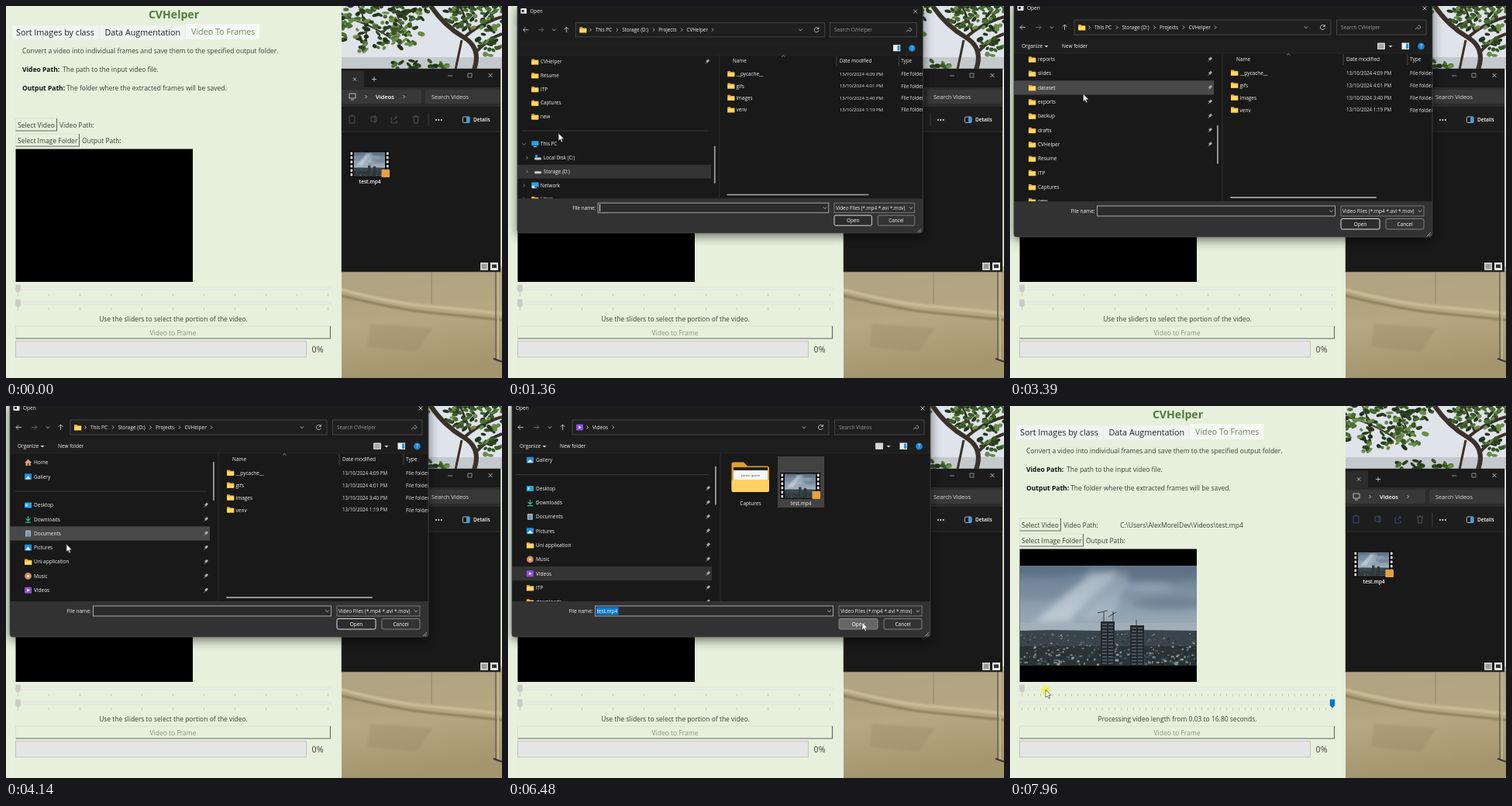
Animation of 640x480 px, one loop 8 s. Source, as an HTML page:

```html
<!DOCTYPE html>
<html lang="en">
<head>
<meta charset="utf-8">
<title>Video to frames</title>
<style>
  html, body { margin: 0; width: 100%; height: 100%; overflow: hidden; background: #e6f0dc; }
  svg { display: block; width: 100vw; height: 100vh; font-family: "Open Sans", "Noto Sans", sans-serif; }
  text { white-space: pre; }
</style>
</head>
<body>
<svg id="stage" viewBox="0 0 640 480"></svg>
<script>
const LOOP = 8000;
const APP = 8.5, TAB = 10.75, UI = 6.5;

let seed = 7;
const rand = (a = 0, b = 1) => {
  seed = (seed * 16807) % 2147483647;
  return a + (b - a) * seed / 2147483647;
};
const pick = list => list[Math.floor(rand(0, list.length))];
const times = (n, fn) => Array.from({ length: n }, (_, i) => fn(i)).join('');

// y is the vertical middle of the capitals
const text = (x, y, s, size, fill, attrs = '') =>
  `<text x="${x}" y="${y + size * .36}" font-size="${size}" fill="${fill}" ${attrs}>${s}</text>`;
const ui = (x, y, s, fill = '#f2f2f2', attrs = '') => text(x, y, s, UI, fill, 'font-weight="500" ' + attrs);
const box = (x, y, w, h, fill, attrs = '') =>
  `<rect x="${x}" y="${y}" width="${w}" height="${h}" fill="${fill}" ${attrs}/>`;
const line = (d, stroke = '#ddd', w = .8, attrs = '') =>
  `<path d="${d}" fill="none" stroke="${stroke}" stroke-width="${w}" ${attrs}/>`;
const shape = (d, fill, attrs = '') => `<path d="${d}" fill="${fill}" ${attrs}/>`;
const group = (id, body, attrs = '') => `<g id="${id}" ${attrs}>${body}</g>`;
const cross = (x, y, r = 2.5) => line(`M${x - r} ${y - r}l${2 * r} ${2 * r}m0 ${-2 * r}l${-2 * r} ${2 * r}`);
const chevronRight = (x, y, c) => line(`M${x - 1} ${y - 2}l2 2l-2 2`, c);
const chevronDown = (x, y, c) => line(`M${x - 2.2} ${y - 1}l2.2 2.2l2.2 -2.2`, c);
const middle = 'text-anchor="middle"';

const icons = {
  folder: (x, y) => shape(`M${x} ${y - 3.5}h3.5l1 1.2h4.7v6.3h-9.2z`, '#e9a92c') + box(x, y - 1.4, 9.2, 5, '#ffd766'),
  home: (x, y) => shape(`M${x} ${y}l4.6 -4.3l4.6 4.3h-1.4v4h-6.4v-4z`, '#d9a08c') + box(x + 3.5, y + 1, 2.2, 3, '#7a4a3c'),
  picture: (x, y) => box(x, y - 4, 9, 8, '#1f8fe0', 'rx="1"') + shape(`M${x + 1} ${y + 3}l3.5 -4l3.5 4z`, '#fff'),
  desktop: (x, y) => box(x, y - 3.5, 9, 7, '#22a7e0', 'rx="1"') + box(x + 1.5, y - 1.5, 2, 3, '#d4f1ff'),
  download: (x, y) => line(`M${x + 4.5} ${y - 4}v6m-2.8 -2.8l2.8 2.8l2.8 -2.8M${x + 1} ${y + 4}h7`, '#2fc49a', 1.2),
  document: (x, y) => box(x + 1, y - 4, 7, 8, '#9fb6cc', 'rx="1"') + line(`M${x + 2.5} ${y - 1.5}h4m-4 2h4m-4 2h4`, '#44617d'),
  music: (x, y) => `<circle cx="${x + 4.5}" cy="${y}" r="4.4" fill="#d98a5c"/><circle cx="${x + 4.5}" cy="${y}" r="1.5" fill="#fff"/>`,
  video: (x, y) => box(x, y - 4, 9, 8, '#8a4fd8', 'rx="1"') + shape(`M${x + 3.2} ${y - 2}l3.6 2l-3.6 2z`, '#fff'),
  pc: (x, y) => box(x, y - 4, 9.5, 6.2, '#2aa0e8', 'rx=".8"') + box(x + 2.5, y + 2.8, 4.5, 1.2, '#9cc'),
  disk: (x, y) => box(x, y - .5, 9, 3, '#c9d0d6', 'rx="1"'),
  system: (x, y) => icons.disk(x, y) + box(x + 1, y - 4, 3, 3, '#2aa0e8'),
  network: (x, y) => icons.pc(x, y) + `<circle cx="${x + 2}" cy="${y + 2}" r="2" fill="#cde6f6"/>`,
};

/* ---------- scenery ---------- */
function citySymbol() {
  const house = () => {
    const depth = rand(), y = 87 + 40 * depth;
    return box(rand(0, 226), y, rand(1, 2 + 3 * depth), rand(.8, 1.5 + 2 * depth),
      pick(['#8d979b', '#6a767b', '#1f272b', '#28332f', '#49565a', '#a9b0b2']), 'opacity=".8"');
  };
  const tower = (x, y, w) => box(x, y, w, 130 - y, '#23292f') +
    times(26, i => box(x + 2 + (i % 2) * (w / 2 - 1), y + 3 + (i >> 1) * 4.2, w / 2 - 3, 1.3, '#626d75'));
  const cloud = (x, y, rx, ry, fill) => `<ellipse cx="${x}" cy="${y}" rx="${rx}" ry="${ry}" fill="${fill}" opacity=".65"/>`;
  return `<symbol id="city" viewBox="0 0 228 129" preserveAspectRatio="none">
    ${box(0, 0, 228, 129, 'url(#sky)')}
    <g filter="url(#soft)">
      ${cloud(30, 4, 60, 9, '#566a7e')}${cloud(175, 8, 70, 12, '#5a6d80')}${cloud(25, 34, 38, 8, '#74889a')}
      ${cloud(195, 48, 50, 9, '#66798a')}${cloud(165, 28, 32, 5, '#9fb0bf')}
      ${shape('M92 10L126 8L64 72L16 74z', '#e4ebf0', 'opacity=".5"')}
      ${shape('M120 8L142 10L120 66L76 70z', '#e4ebf0', 'opacity=".25"')}
    </g>
    ${box(0, 74, 228, 9, '#a9b6bf', 'opacity=".5"')}
    ${shape('M0 84L40 83L100 84L160 83L228 84V129H0z', '#39454a')}${box(0, 104, 228, 25, '#20292b', 'opacity=".6"')}
    ${times(420, house)}
    ${tower(104, 72, 18)}${tower(142, 77, 18)}
    ${line('M108 73V60M100 61L113 58M120 74V59M114 66L124 60M150 78V70', '#2a3137', .9)}
    </symbol>`;
}

function treePhoto() {
  const leaves = (n, cx, cy, rx, ry) => times(n, () => {
    const a = rand(0, 2 * Math.PI), r = Math.sqrt(rand());
    const x = cx + rx * r * Math.cos(a), y = cy + ry * r * Math.sin(a);
    return `<ellipse cx="${x}" cy="${y}" rx="${rand(2, 5)}" ry="${rand(1.5, 3)}" fill="${pick(['#2c4220', '#3b5729', '#4c6d33', '#6b8b4a', '#22331b'])}" transform="rotate(${rand(-50, 50)} ${x} ${y})"/>`;
  });
  const bark = '#3a312a';
  return box(432, 0, 208, 82, '#dfe3ea') + box(432, 66, 208, 16, '#c3c9cc') +
    line('M433 14Q470 22 500 44M455 0Q470 30 462 58M500 0L512 30', bark, 1.8) +
    line('M548 0Q566 26 590 40T604 82', bark, 6) +
    line('M590 42Q608 24 640 14M604 62Q622 42 640 36', bark, 4) +
    line('M586 0L600 34M588 44L580 82', bark, 3) +
    leaves(130, 470, 22, 48, 38) + leaves(40, 512, 34, 26, 20) + leaves(30, 525, 6, 28, 12) +
    leaves(110, 612, 12, 46, 20) + leaves(22, 625, 48, 18, 16) + leaves(22, 530, 76, 42, 6);
}

const carPhoto = () => box(432, 342, 208, 138, 'url(#car)') +
  `<g filter="url(#blur)">` +
  shape('M425 336H650V378Q540 384 425 362z', '#b3a683', 'opacity=".7"') +
  line('M425 364Q500 384 550 388T650 398', '#c9bd99', 4) +
  line('M425 372Q500 391 550 396T650 406', '#847958', 2.5) +
  shape('M470 410L550 416L530 446L466 440z', '#968a68', 'opacity=".35"') + '</g>' +
  line('M549 343V384', '#8a7f60', .8) +
  line('M632 343V456', '#6d6450', 1.6) + line('M635 343V456', '#bfb392', 2) + line('M629 455L640 459', '#37322a', 2);

/* ---------- app window ---------- */
const raised = (x, y, w, h) => box(x, y, w, h, '#e6f0dc') +
  line(`M${x} ${y + h}V${y}H${x + w}`, '#d6dfcd') + line(`M${x} ${y + h}H${x + w}V${y}`, '#646864', 1.1);
const groove = y => box(12, y - 1.5, 407, 3, '#eaeee6', 'stroke="#d8ded2" stroke-width=".6"');
const handle = (x, y, fill) => shape(`M${x - 3.2} ${y - 5.5}h6.4v8l-3.2 3.2l-3.2 -3.2z`, fill);
const ticks = (n, gap) => [373, 391].map(y => times(n, i => box(15.2 + i * gap, y - 1.5, .8, 3, '#b4bdac'))).join('');

function app() {
  const ink = '#3c3f3a';
  return box(0, 0, 433, 480, '#e6f0dc') + box(8, 43, 416, 437, '#e6f0dc', 'stroke="#eaf2e2" stroke-width=".8"') +
    text(216.5, 11, 'CVHelper', 14.1, '#4d7d38', middle + ' font-weight="700"') +
    box(8, 25, 112, 18, '#f1f3f1') + box(121.5, 25, 109, 18, '#f1f3f1') + box(232, 23, 95, 20, '#f6f9f3') +
    text(13, 34, 'Sort Images by class', TAB, '#222') + text(127.5, 34, 'Data Augmentation', TAB, '#222') +
    text(239, 33.5, 'Video To Frames', TAB, '#6f8a62') +
    text(21, 58, 'Convert a video into individual frames and save them to the specified output folder.', APP, ink) +
    text(21, 82, 'Video Path:', APP, '#111', 'font-weight="700"') + text(73, 82, 'The path to the input video file.', APP, ink) +
    text(21, 106, 'Output Path:', APP, '#111', 'font-weight="700"') +
    text(78, 106, 'The folder where the extracted frames will be saved.', APP, ink) +
    raised(12.5, 145, 53, 16) + text(15, 153.5, 'Select Video', APP, ink) + text(69, 153.5, 'Video Path:', APP, ink) +
    raised(12.5, 165, 82, 16) + text(15, 173.5, 'Select Image Folder', APP, ink) + text(98, 173.5, 'Output Path:', APP, ink) +
    box(12.5, 184.5, 228.5, 171.5, '#000') + groove(364.5) + groove(383.5) +
    group('empty', ticks(11, 40) + handle(15.5, 365, '#c9ccc6') + handle(15.5, 384, '#c9ccc6') +
      text(216, 404, 'Use the sliders to select the portion of the video.', APP, ink, middle)) +
    group('loaded', text(142, 153.5, 'C:\\Users\\AlexMorelDev\\Videos\\test.mp4', APP, ink) +
      '<use href="#city" x="13" y="206" width="228" height="129"/>' + ticks(51, 8) +
      handle(15.5, 365, '#c9ccc6') + handle(416, 384, '#0f74cf') +
      text(216, 404, 'Processing video length from 0.03 to 16.80 seconds.', APP, ink, middle)) +
    raised(12.5, 413, 406, 16) + text(215.5, 421.5, 'Video to Frame', APP, '#8d928a', middle) +
    box(12.5, 432.5, 375, 20.5, '#e5e5e5', 'stroke="#c2c4c0"') + text(394.5, 443.5, '0%', TAB, ink);
}

/* ---------- file windows ---------- */
const filmThumb = (x, y) => box(x, y, 52, 34, '#0c0c0c') +
  times(12, i => box(x + (i % 2 ? 48 : 1.5), y + 1.6 + (i >> 1) * 5.5, 2.6, 3.2, '#f2f2f2')) +
  `<use href="#city" x="${x + 6}" y="${y + 1.5}" width="40" height="31"/>` + box(x + 41.5, y + 24, 10.5, 10, '#e8a03c', 'rx="1"');

const toolIcons = c => line('M443 142h7v9h-7zM445 141h3M471 143h7v6h-7zM476 141v10M498 144h-1v7h7v-3M500 147l4 -4m-2.5 0h2.5v2.5', c, .8) +
  line('M525 143h8m-7 0l.8 8h4.4l.8 -8M528 142h2', '#666');

const explorer = () => box(433, 81, 205, 262, '#191919', 'stroke="#454545" stroke-width=".6"') +
  box(433, 81, 205, 24, '#1b1b1b') + box(433, 84, 29, 21, '#2c2c2c') + box(433, 105, 205, 25, '#2c2c2c') +
  box(433, 130, 205, 32, '#1d1d1d') + line('M433 162H638', '#333') +
  cross(450, 94.5, 2) + line('M472 94.5h6m-3 -3v6') + line('M570 90h6', '#aaa') +
  line('M596 87h5v5h-5z', '#aaa') + cross(625, 89.5) +
  box(433, 108, 103, 18, '#383838', 'rx="2"') + box(541, 108, 97, 18, '#383838', 'rx="2"') +
  line('M443 113h8v6h-8zM445 121h4') + chevronRight(464.5, 117) + chevronRight(513.5, 117) +
  text(477, 117.5, 'Videos', 7.5, '#fff', 'font-weight="600"') + text(549, 117.5, 'Search Videos', 7.4, '#ddd') +
  group('toolsIdle', toolIcons('#5c5c5c')) + group('toolsReady', toolIcons('#44548a')) +
  line('M545 138V155', '#444') + times(3, i => `<circle cx="${555 + i * 3.4}" cy="147" r="1" fill="#eee"/>`) +
  box(589.5, 143, 8.5, 7.5, '#111', 'stroke="#cfe6f5" stroke-width=".8" rx="1"') + box(594, 143, 4, 7.5, '#3aa0e0') +
  text(603, 147, 'Details', UI, '#fff', 'font-weight="600"') +
  filmThumb(443, 187) + text(469.5, 226.5, 'test.mp4', UI, '#fff', middle + ' font-weight="600"') +
  box(612, 331, 10, 10, '#c9c9c9') + line('M614 334h6m-6 2h6m-6 2h6', '#444', .7) +
  box(625, 331, 10, 10, '#e8e8e8') + box(627, 333.5, 6, 4.5, '#333');

const ROW = 18.3, TOP = 73;
const SEPARATOR = null;
const pinned = names => names.map(n => ({ label: n, icon: 'folder', pin: true }));
const recent = names => names.map(n => ({ label: n, icon: 'folder' }));
const rows = [
  { label: 'Home', icon: 'home' }, { label: 'Gallery', icon: 'picture' }, SEPARATOR,
  { label: 'Desktop', icon: 'desktop', pin: true }, { label: 'Downloads', icon: 'download', pin: true },
  { label: 'Documents', icon: 'document', pin: true }, { label: 'Pictures', icon: 'picture', pin: true },
  ...pinned(['Uni application']), { label: 'Music', icon: 'music', pin: true }, { label: 'Videos', icon: 'video', pin: true },
  ...pinned(['ITP', 'downloads', 'assets', 'models', 'labels', 'notes', 'scripts', 'reports', 'slides', 'dataset', 'exports', 'backup', 'drafts', 'CVHelper']),
  ...recent(['Resume', 'ITP', 'Captures', 'new']), SEPARATOR,
  { label: 'This PC', icon: 'pc', depth: 1, open: true }, { label: 'Local Disk (C:)', icon: 'system', depth: 2 },
  { label: 'Storage (D:)', icon: 'disk', depth: 2 }, { label: 'Network', icon: 'network', depth: 1 }, { label: 'Linux', icon: 'folder', depth: 1 },
];
const rowY = i => TOP + i * ROW;
const VIDEOS = rows.findIndex(r => r && r.label === 'Videos');
const STORAGE = rows.findIndex(r => r && r.label === 'Storage (D:)');

function sidebarRow(r, i) {
  const y = rowY(i);
  if (!r) return line(`M11 ${y + .5}H259`, '#444');
  const dx = r.depth === 2 ? 4 : 0;
  let out = icons[r.icon](24 + dx, y) + ui(36 + dx, y, r.label);
  if (r.depth) out += (r.open ? chevronDown : chevronRight)(14 + dx, y, '#aaa');
  if (r.pin) out += line(`M255.5 ${y + 2.8}l2 -2`, '#aaa') + shape(`M256 ${y - .5}l3 -2.8l2 2l-2.8 3z`, '#aaa');
  return out;
}

function projectList() {
  const entry = (name, time, i) => {
    const y = 86.5 + i * 15.9;
    return icons.folder(285, y - .5) + ui(296.5, y, name) + text(434, y, `13/10/2024 ${time} PM`, 6.25, '#e2e2e2', 'font-weight="500"') + ui(516, y, 'File folder', '#e2e2e2');
  };
  return ui(292, 69, 'Name') + ui(434, 69, 'Date modified') + ui(516, 69, 'Type') +
    line('M430 62V76M513 62V76', '#555') + line('M357 63.5l2.2 -2l2.2 2', '#aaa') +
    [['__pycache__', '4:09'], ['gifs', '4:01'], ['images', '3:40'], ['venv', '1:19']].map((e, i) => entry(...e, i)).join('') +
    box(284, 246.3, 189, 1.6, '#a8a8a8', 'rx=".8"');
}

const videoList = () => box(283, 65, 60, 66, '#434343', 'id="hoverCaptures"') + box(348, 65, 60, 66, '#434343', 'id="hoverClip"') +
  shape('M288.5 75q0 -2.5 2.5 -2.5h13l5 5h25q3 0 3 3v28h-48.5z', '#e0a02a') + box(291, 79, 44, 18, '#f7f7f7') +
  box(291, 79, 44, 4, '#222') + ui(313, 89, 'Lorem ipsum', '#444', middle + ' style="font-size:4px"') +
  box(288.5, 95, 48.5, 16, '#ffd261', 'rx="2"') + ui(313, 125.5, 'Captures', '#f2f2f2', middle) +
  filmThumb(351, 86) + ui(378, 125.5, 'test.mp4', '#f2f2f2', middle);

const crumbs = () => icons.folder(88, 27.5) +
  [[109, 'This PC'], [144.5, 'Storage (D:)'], [193, 'Projects'], [230.5, 'CVHelper']].map(([x, s]) => ui(x, 27.5, s) + chevronRight(x - 6.5, 27.5)).join('') +
  chevronRight(265, 27.5) + ui(427, 27.5, 'Search CVHelper', '#9a9a9a');

const dialog = () => box(5, -6, 540, 304, '#000', 'rx="5" opacity=".55" filter="url(#shadow)"') +
  `<g clip-path="url(#frame)">` +
  box(5, -6, 540, 304, '#191919') + box(5, -6, 540, 67, '#1c1c1c') + box(5, 43, 540, 18, '#1e1e1e') + box(5, 252, 540, 46, '#323232') +
  group('titleIcon', box(9.5, -1, 8, 7, '#e8e8e8', 'rx="1"') + box(11, 1, 3, 3, '#333')) +
  `<g id="title">${ui(0, 3, 'Open')}</g>` + cross(535, 3) +
  line('M20 27.5h-7m3 -3l-3 3l3 3') + line('M33 27.5h7m-3 -3l3 3l-3 3', '#777') + chevronDown(54, 27.5) + line('M70.5 31v-7m-3 3l3 -3l3 3') +
  box(83, 18, 331, 19, '#1f1f1f', 'stroke="#555" stroke-width=".7"') + box(421.5, 18, 115.5, 19, '#1f1f1f', 'stroke="#555" stroke-width=".7"') +
  chevronDown(382, 27.5) + line('M406 26a3 3 0 1 0 .3 2.4M406.3 24v2.4h-2.4') +
  line('M526.5 25.6a2 2 0 1 1 -.8 2l-2.8 2.6', '#bbb') +
  group('crumbsProject', crumbs()) +
  group('crumbsVideos', icons.video(88, 27.5) + chevronRight(102.5, 27.5) + ui(109, 27.5, 'Videos') + chevronRight(135.5, 27.5) + ui(427, 27.5, 'Search Videos', '#9a9a9a')) +
  group('toolbar', ui(15, 52, 'Organize') + shape('M44.5 51h5l-2.5 2.6z', '#ddd') + ui(67, 52, 'New folder') +
    box(474, 47.5, 10, 8.5, '#d6d6d6', 'rx="1"') + line('M475.5 50h7m-7 2h7m-7 2h7', '#555', .7, 'id="viewLines"') +
    shape('M488.5 51h5l-2.5 2.6z', '#ddd')) +
  box(505.5, 47.5, 9.5, 8.5, '#eee') + box(511, 48.5, 3.2, 6.5, '#2a92d8') +
  `<circle cx="530.5" cy="52" r="4.4" fill="#1b87d8"/>` + ui(530.5, 52, '?', '#fff', middle) +
  line('M5 61H545', '#2a2a2a') +
  `<g clip-path="url(#pane)"><g id="list">` +
    box(5, 0, 258, ROW, '#484848', 'id="hoverRow"') + box(5, 0, 258, ROW, '#343434', 'id="activeRow" stroke-width=".8"') +
    rows.map(sidebarRow).join('') + `</g></g>` +
  box(267, 0, 1.8, 50, '#a0a0a0', 'id="thumb" rx=".9"') + line('M274 61V252', '#333') +
  group('projectFiles', projectList()) + group('videoFiles', videoList()) +
  ui(78.5, 264.5, 'File name:') + box(112.5, 258, 307, 13, '#2b2b2b', 'stroke="#b5b5b5" stroke-width=".9"') + chevronDown(414.5, 264.5) +
  line('M115 259.5V269.5', '#fff', .9, 'id="caret"') +
  group('fileName', box(114, 259.5, 28.5, 10, '#0f78d4') + ui(114.5, 264.5, 'test.mp4', '#fff')) +
  box(427, 258, 107, 13, '#323232', 'stroke="#999" stroke-width=".7"') + ui(429, 264.5, 'Video Files (*.mp4 *.avi *.mov)') + chevronDown(529, 264.5) +
  box(427, 274.5, 50, 13.5, '#2c2c2c', 'id="openButton" rx="2" stroke="#ddd"') + ui(452, 281.5, 'Open', '#fff', middle) +
  box(485, 274.5, 49, 13.5, '#333', 'rx="2" stroke="#999" stroke-width=".8"') + ui(509.5, 281.5, 'Cancel', '#fff', middle) +
  line('M538 297l5 -5m-2.5 5l2.5 -2.5', '#bbb') + '</g>' +
  box(5, -6, 540, 304, 'none', 'rx="4" stroke="#4c4c4c" stroke-width=".7"');

const pointer = () => group('pointer', `<circle id="press" cy=".8" r="6" fill="#f3ee58" opacity=".9"/>` +
  shape('M0 0V10L2.3 8L3.9 11.6L5.5 10.9L3.9 7.4H7z', '#fff', 'stroke="#222" stroke-width=".6"'));

const stage = document.getElementById('stage');
stage.innerHTML = `<defs>
  <linearGradient id="sky" x2="0" y2="1"><stop stop-color="#62778c"/><stop offset=".4" stop-color="#8c9eae"/><stop offset=".65" stop-color="#9dabb6"/></linearGradient>
  <linearGradient id="car" x2=".2" y2="1"><stop stop-color="#a99c78"/><stop offset=".5" stop-color="#b5a882"/><stop offset="1" stop-color="#a3966f"/></linearGradient>
  <filter id="soft"><feGaussianBlur stdDeviation="4"/></filter>
  <filter id="blur"><feGaussianBlur stdDeviation="1.2"/></filter>
  <filter id="shadow" x="-10%" y="-10%" width="120%" height="125%"><feOffset dy="4"/><feGaussianBlur stdDeviation="7"/></filter>
  <clipPath id="frame"><rect x="5" y="-6" width="540" height="304" rx="4"/></clipPath>
  <clipPath id="pane"><rect x="5" y="61.5" width="262" height="190.5"/></clipPath>
  ${citySymbol()}</defs>` + treePhoto() + carPhoto() + app() + explorer() + group('dialog', dialog()) + pointer();

/* ---------- motion ---------- */
const path = [
  [180, 592, 484], [400, 480, 360], [700, 160, 200], [860, 46, 157], [980, 44, 156], [1240, 50, 158], [1360, 65, 164],
  [1600, 95, 160], [1830, 92, 140], [2000, 98, 120], [2240, 101, 102], [2400, 100, 90], [2780, 100, 92],
  [2990, 96, 104], [3250, 96, 104], [3800, 90, 140], [4070, 80, 166], [4140, 78, 178], [4450, 66, 236], [4600, 62, 240],
  [4800, 62, 240], [4950, 150, 200], [5200, 342, 96], [5330, 358, 112], [5470, 358, 112], [5540, 360, 113], [5810, 360, 113],
  [6000, 372, 150], [6300, 445, 272], [6480, 457, 279], [6600, 457, 279], [7000, 380, 300], [7420, 240, 266],
  [7650, 80, 368], [7780, 16, 386], [7880, 40, 370], [7960, 46, 366]];
const zoomKeys = [[1230, .88], [1360, .969], [1480, 1], [6540, 1], [6640, .92]];
const fadeKeys = [[1230, 0], [1320, 1], [6550, 1], [6640, 0]];
const scrollKeys = [[3250, 424], [3800, 0], [4740, 0], [4860, 21.5]];
const presses = [[880, 980], [4600, 4700], [5800, 5870], [6520, 6580], [7890, LOOP]];

function track(keys, t) {
  const k = keys.findIndex(key => key[0] > t);
  if (k === 0) return keys[0].slice(1);
  if (k < 0) return keys[keys.length - 1].slice(1);
  const [a, b] = [keys[k - 1], keys[k]], p = (t - a[0]) / (b[0] - a[0]);
  return a.slice(1).map((v, i) => v + (b[i + 1] - v) * p);
}

const el = new Proxy({}, { get: (cache, id) => cache[id] || (cache[id] = document.getElementById(id)) });
const set = (id, name, value) => el[id].setAttribute(name, value);
const show = (id, on) => set(id, 'display', on ? 'inline' : 'none');

function update(t) {
  const [x, y] = track(path, t), [hx, hy] = track(path, t - 65);
  const [zoom] = track(zoomKeys, t), [fade] = track(fadeKeys, t), [scroll] = track(scrollKeys, t);

  set('pointer', 'transform', `translate(${x} ${y})`);
  show('pointer', t >= 180);
  show('press', presses.some(([a, b]) => t >= a && t < b));

  show('dialog', fade > 0);
  set('dialog', 'opacity', fade);
  set('dialog', 'transform', `translate(231 132) scale(${zoom}) translate(-231 -132)`);
  show('toolbar', t > 1480);
  show('titleIcon', t < 6440);
  set('title', 'transform', `translate(${t < 6440 ? 22 : 10} 0)`);

  const inVideos = t >= 4800, pathReady = t >= 4940;
  set('list', 'transform', `translate(0 ${-scroll})`);
  set('thumb', 'y', 72 + scroll * 110 / 424);
  const over = Math.round((hy + scroll - TOP) / ROW);
  show('hoverRow', t > 1480 && hx < 263 && hy > 61 && hy < 252 && rows[over]);
  set('hoverRow', 'y', rowY(over) - ROW / 2);
  const focused = t > 4640 && t < 5810;
  set('activeRow', 'y', rowY(t < 4640 ? STORAGE : VIDEOS) - ROW / 2);
  set('activeRow', 'fill', focused ? '#484848' : '#343434');
  set('activeRow', 'stroke', focused ? '#a8a8a8' : 'none');

  show('projectFiles', !inVideos);
  show('videoFiles', inVideos);
  show('viewLines', !inVideos);
  show('crumbsProject', !pathReady);
  show('crumbsVideos', pathReady);
  show('hoverCaptures', x > 283 && x < 345 && y < 131);
  show('hoverClip', t >= 5810 || (x > 348 && y < 131));
  show('caret', t < 4640 && (t + 760) % 1060 < 530);
  show('fileName', t >= 5830);
  const onOpen = x > 427 && x < 477 && y > 274;
  set('openButton', 'fill', onOpen ? '#666' : '#2c2c2c');
  set('openButton', 'stroke', onOpen ? '#888' : '#ddd');

  const loaded = t >= 6900;
  show('empty', !loaded);
  show('loaded', loaded);
  show('toolsIdle', t < 6640);
  show('toolsReady', t >= 6640);
}

const start = performance.now();
function tick() {
  update((performance.now() - start) % LOOP);
  requestAnimationFrame(tick);
}
tick();
</script>
</body>
</html>
```
